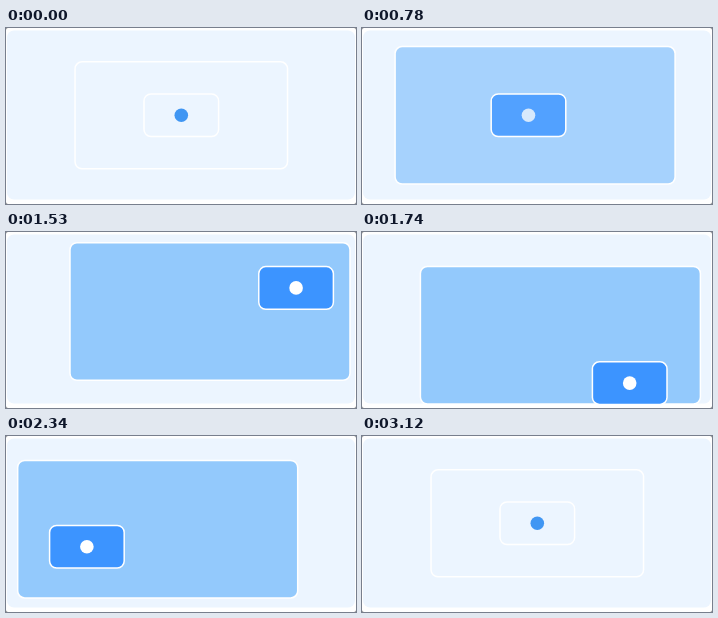
An HTML page that plays this animation: 350 px wide and 176 px high, repeating every 3150 ms.

```html
<!DOCTYPE html>
<html lang="en">
<head>
<meta charset="utf-8">
<title>Nested parallax drag</title>
<style>
  html, body { margin: 0; width: 100%; height: 100%; overflow: hidden; background: #777; }
  svg { display: block; width: 100vw; height: 100vh; }
  .frame { stroke: #fff; stroke-width: 1.5; }
</style>
</head>
<body>
<svg viewBox="0 0 350 176">
  <rect width="350" height="176" rx="2" fill="#fff"/>
  <rect x="1" y="2.5" width="348" height="169" rx="7" fill="#ecf5ff"/>
  <rect id="middle" class="frame" rx="7"/>
  <rect id="inner" class="frame" rx="7"/>
  <circle id="dot" r="6.8"/>
</svg>
<script>
  const LOOP = 3150, STEP = 30;
  const CENTER_X = 175.3, CENTER_Y = 87.3;
  const RADIUS = 119, MAX_Y = 63.8;
  const PALE = "#ecf5ff", SKY = "#93c9fc", BLUE = "#3c94ff";

  const [middle, inner, dot] = ["middle", "inner", "dot"].map(id => document.getElementById(id));
  const clamp = (v, lo, hi) => Math.min(hi, Math.max(lo, v));
  const smooth = p => p * p * (3 - 2 * p);
  const ramp = (t, from, to) => smooth(clamp((t - from) / (to - from), 0, 1));
  const mix = (a, b, p) => `color-mix(in srgb, ${b} ${p * 100}%, ${a})`;

  // The drag leaves to the left, then circles clockwise while slowing down.
  function dragOffset(t) {
    const s = (t - 1080) / 1000;
    const degrees = Math.max(-180, -143.4 + s * (297.9 - s * (22.6 + 15 * s)));
    const angle = degrees * Math.PI / 180;
    const radius = RADIUS * ramp(t, 720, 1080) * (1 - ramp(t, 2250, 2580));
    return {
      x: radius * Math.cos(angle),
      y: clamp(radius * Math.sin(angle), -MAX_Y, MAX_Y)
    };
  }

  function place(el, x, y, width, height, fill) {
    const box = { x: x - width / 2, y: y - height / 2, width, height };
    for (const name in box) el.setAttribute(name, box[name]);
    el.style.fill = fill;
  }

  function draw(now) {
    const t = Math.floor((now % LOOP) / STEP) * STEP;
    const drag = dragOffset(t);
    const held = 1 - ramp(t, 2340, 2580);
    const grow = ramp(t, 420, 750) * held;
    const tint = ramp(t, 420, 930) * held;
    const x = CENTER_X + drag.x, y = CENTER_Y + drag.y;
    const middleFill = mix(PALE, SKY, tint);

    place(middle, CENTER_X + drag.x / 4, CENTER_Y + drag.y / 4,
      212.5 + 67.5 * grow, 107 + 30.5 * grow, middleFill);
    place(inner, x, y, 74.6, 42.6, mix(middleFill, BLUE, tint));
    dot.setAttribute("cx", x);
    dot.setAttribute("cy", y);
    dot.style.fill = mix("#4096f3", "#fff", tint);
  }

  const start = performance.now();
  function tick() {
    draw(performance.now() - start);
    requestAnimationFrame(tick);
  }
  tick();
</script>
</body>
</html>
```
